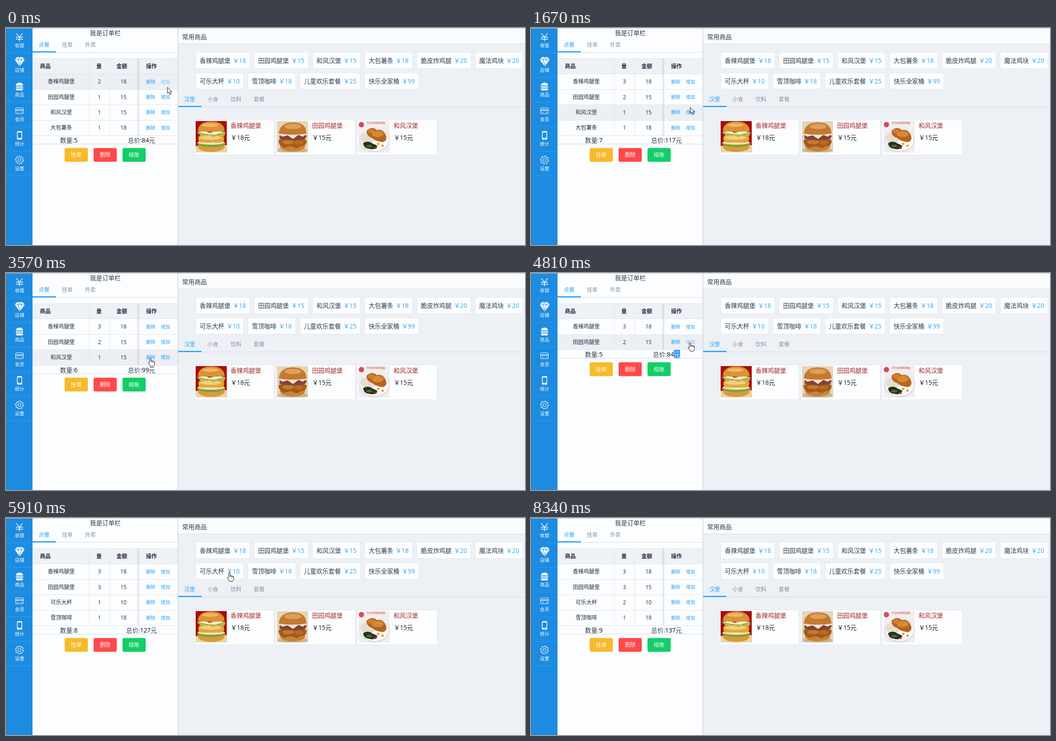
Recreate the animation shown at these times as an HTML page. Size 1155x485 px, loop 8440 ms.

```html
<!DOCTYPE html>
<html lang="zh-CN">
<head>
<meta charset="utf-8">
<title>订单</title>
<style>
html, body { margin: 0; width: 100%; height: 100%; overflow: hidden; background: #edf0f5; }
svg { display: block; width: 1155px; height: 485px; font-family: "Open Sans", "Noto Sans CJK SC", "Noto Sans CJK", sans-serif; }
</style>
</head>
<body>
<svg id="stage" viewBox="0 0 1155 485"></svg>
<script>
const LOOP = 8440;
const BLUE = '#20a0ff', INK = '#2c3e50', DARK = '#1f2d3d', LINE = '#dfe6ec', PALE = '#fcfdfe', GREY = '#edf0f5';
const BIG = 13.71, MID = 12, SMALL = 10.29, ROW = 34.3, TOP = 102.6;

const menu = [
  ['香辣鸡腿堡', 18], ['田园鸡腿堡', 15], ['和风汉堡', 15], ['大包薯条', 18], ['脆皮炸鸡腿', 20],
  ['魔法鸡块', 20], ['可乐大杯', 10], ['雪顶咖啡', 18], ['儿童欢乐套餐', 25], ['快乐全家桶', 99]
];

// time, order lines as menu index + quantity
const orders = [
  [0, '02 11 21 31'], [290, '03 11 21 31'], [960, '03 12 21 31'], [2880, '03 12 21'], [3720, '03 12'],
  [4940, '03 13'], [5350, '03 13 61'], [5910, '03 13 61 71'], [7010, '03 13 62 71']
];

// time, x, y, hand pointer
const path = [
  [0, 359, 132, 0], [130, 357, 120, 1], [450, 356, 119, 1], [790, 354, 152, 1], [1130, 353, 150, 1],
  [1280, 354, 177, 0], [1800, 354, 177, 0], [2340, 321, 221, 1], [2630, 320, 228, 1], [2750, 320, 225, 1],
  [2900, 320, 225, 1], [3400, 321, 189, 1], [3720, 321, 189, 0], [3860, 324, 181, 0], [4130, 338, 165, 0],
  [4400, 354, 155, 1], [4940, 354, 155, 1], [5300, 482, 113, 1], [5370, 482, 113, 1], [5630, 587, 117, 1],
  [5910, 497, 122, 1], [6030, 497, 122, 1], [6180, 470, 132, 0], [6720, 354, 185, 1], [7010, 354, 185, 1],
  [7160, 390, 205, 0], [7510, 700, 374, 0]
];

// first, last, count of screen updates
const bursts = [
  [0, 0, 1], [130, 1130, 7], [1280, 1280, 1], [1670, 2630, 8], [2750, 3720, 8], [3860, 4400, 5],
  [4810, 5630, 7], [5910, 6860, 8], [7010, 7640, 6], [8340, 8340, 1]
];
const ticks = bursts.flatMap(([a, b, n]) =>
  Array.from({ length: n }, (_, i) => Math.round(n > 1 ? a + (b - a) * i / (n - 1) : a)));

const rect = (x, y, w, h, fill, more = '') =>
  `<rect x="${x}" y="${y}" width="${w}" height="${h}" fill="${fill}" ${more}/>`;
const text = (x, cy, s, size, fill, more = '') =>
  `<text x="${x}" y="${(cy + size * 0.37).toFixed(2)}" font-size="${size}" fill="${fill}" ${more}>${s}</text>`;
const oval = (x, y, rx, ry, fill, more = '') =>
  `<ellipse cx="${x}" cy="${y}" rx="${rx}" ry="${ry}" fill="${fill}" ${more}/>`;
const shape = (d, fill, more = '') => `<path d="${d}" fill="${fill}" ${more}/>`;
const MIDDLE = 'text-anchor="middle"', BOLD = 'font-weight="700"';

function sidebar() {
  const line = d => shape(d, 'none', 'stroke="#fff" stroke-width="1.4"');
  const teeth = Array.from({ length: 48 }, (_, i) => {
    const a = (i + 0.5) * Math.PI / 24, r = i % 6 < 3 ? 9 : 7.2;
    return `${(30 + r * Math.cos(a)).toFixed(1)} ${(295 + r * Math.sin(a)).toFixed(1)}`;
  }).join('L');
  const icons = [
    line('M23 12L30 20.5L37 12M30 20.5V29.5M22 20.5H38M22 25H38'),
    shape('M24 65H37L41.5 71L30.5 86L19.5 71Z', '#fff') +
      shape('M20 71H41M24 65L27 71L30.5 65.5L34 71L37 65M27 71L30.5 85L34 71', 'none', 'stroke="#1d8ce0" stroke-width=".9"'),
    shape('M22 128Q23 122 30 122T38 128Z', '#fff') + rect(21.5, 129.5, 17, 2, '#fff', 'rx="1"') +
      rect(22, 132.8, 16, 2, '#fff', 'rx="1"') + shape('M22 136H38Q38 139.5 35 139.5H25Q22 139.5 22 136Z', '#fff'),
    shape('M23 178.5H37Q38.5 178.5 38.5 180V190Q38.5 191.5 37 191.5H23Q21.5 191.5 21.5 190V180Q21.5 178.5 23 178.5ZM21.5 182.5H38.5M21.5 184.5H38.5M24 188.5H28M33 188.5H36', 'none', 'stroke="#fff"'),
    rect(24.5, 230.5, 11.5, 19, '#fff', 'rx="2"') + rect(26, 233.5, 8.5, 12, '#1d8ce0') + oval(30.2, 247.5, 1, 1, '#1d8ce0'),
    shape('M' + teeth + 'Z', 'none', 'stroke="#fff" stroke-width="1.1"') + oval(30, 295, 3.2, 3.2, 'none', 'stroke="#fff" stroke-width="1.1"')
  ];
  const labels = ['收银', '店铺', '商品', '会员', '统计', '设置'];
  return rect(0, 0, 59, 485, '#1d8ce0') + icons.join('') +
    labels.map((s, i) => text(30.3, 39 + 55 * i, s, SMALL, '#fff', MIDDLE) + rect(0, 55 + 55 * i, 59, 1, BLUE)).join('');
}

function tabs(x, cy, right, names) {
  return rect(x, cy + 16, right - x, 1, '#d1dbe5') + rect(x, cy + 14, 52, 2.6, BLUE) +
    names.map((s, i) => text(x + 13.8 + 51.5 * i, cy, s, MID, i ? '#8391a5' : BLUE)).join('');
}

function chips() {
  const draw = (items, y) => {
    let x = 422;
    return items.map(([name, price]) => {
      const step = 60.6 + 13.88 * name.length, left = Math.round(x), w = Math.round(step - 9.2);
      x += step;
      return rect(left + 0.5, y + 0.5, w - 1, 36, PALE, 'stroke="#e5e9f2"') +
        text(left + 9, y + 19, name, BIG, INK) +
        text(left + w - 9, y + 19, '￥' + price, BIG, '#35a5f5', 'text-anchor="end"');
    }).join('');
  };
  return draw(menu.slice(0, 6), 54) + draw(menu.slice(6), 100);
}

const photos = [
  rect(0, 0, 70, 70, '#a80d0c') + shape('M0 56Q35 48 70 54V70H0Z', '#e7d7a4') +
    oval(35, 57, 30, 12, '#d99a3d') + oval(35, 50, 32, 8, '#7fa136') + oval(35, 48, 30, 5, '#efe4b3') +
    rect(6, 31, 58, 17, '#e5a63f', 'rx="8"') + oval(33, 37, 24, 5, '#f3cf78') +
    shape('M3 25Q10 20 20 24T40 23T67 25L64 34L52 30L40 36L26 30L14 35Z', '#a9bd55') +
    shape('M8 25L20 21L32 27L48 22L62 25L44 30L26 29Z', '#f2edcf') +
    shape('M5 22Q6 1 35 1T65 22Q35 26 5 22Z', '#dc9136') + oval(33, 9, 18, 4, '#efb862'),
  rect(0, 0, 70, 70, '#e3d5b9') + oval(35, 65, 34, 6, '#c9b491') +
    oval(35, 56, 28, 12, '#c88338') + shape('M4 42Q35 34 66 42Q68 56 53 56L45 61L31 56L16 60Q2 54 4 42Z', '#a45a1b') +
    oval(25, 47, 13, 5, '#c57a2a') + oval(49, 48, 10, 5, '#bd6a22') + oval(35, 38, 30, 5, '#7a4a3c') +
    oval(36, 34, 31, 5, '#8d3a3c') + shape('M4 29Q35 24 66 29L58 35L48 31L36 40L24 32L12 35Z', '#eee6d0') +
    shape('M4 28Q6 3 36 3T66 28Q35 33 4 28Z', '#c47a30') + oval(36, 12, 19, 6, '#dda058'),
  rect(0, 0, 70, 70, '#f1eeee') + oval(6.5, 8, 6, 6, '#d64b5c') + text(18, 4, '今日好味鸡块饭', 6, '#c4444c') +
    oval(36, 43, 34, 27, '#dcdce0') + oval(36, 42, 32, 25, '#faf9f8') +
    oval(21, 38, 16, 13, '#e5ddd0') + shape('M18 22Q29 10 41 20Q55 17 61 31Q66 43 55 47Q39 46 31 38Q18 34 18 22Z', '#b96420') +
    oval(43, 29, 13, 7, '#d58a35') + oval(29, 23, 8, 5, '#cf7f30') +
    shape('M10 50Q20 42 31 50L43 55Q37 66 24 62Q12 61 10 50Z', '#25331f') +
    oval(24, 56, 7, 3, '#51682c') + oval(44, 51, 6, 4.5, '#fff') + oval(44, 51, 3, 2.4, '#e39b36') +
    oval(54, 55, 6, 4.5, '#fff') + oval(54, 55, 3, 2.4, '#e39b36') + oval(38, 60, 3, 2.5, '#b42c22')
];

function cards() {
  return [420, 601, 782].map((x, i) =>
    rect(x - 0.5, 205.5, i < 2 ? 177 : 178.5, 78, PALE, 'stroke="#e2e7f0"') +
    `<svg x="${x + [2, 2, 2.5][i]}" y="208" width="69.5" height="70" viewBox="0 0 70 70" preserveAspectRatio="none">${photos[i]}</svg>` +
    text(x + 79.5 + i * 0.5, 217.5, menu[i][0], BIG, '#a52a2a') +
    text(x + 80 + i * 0.5, 244.5, `￥${menu[i][1]}元`, BIG, '#151d26')).join('');
}

function backdrop() {
  return rect(0, 0, 1155, 485, GREY) + rect(59, 0, 323, 485, PALE) +
    text(221, 11, '我是订单栏', BIG, INK, MIDDLE) + tabs(59, 38, 382, ['点餐', '挂单', '外卖']) +
    rect(383, 0, 772, 35, '#fafbfd') + rect(383, 35, 772, 1, '#d3dce6') + text(392, 19.5, '常用商品', BIG, INK) +
    chips() + tabs(383, 160, 1155, ['汉堡', '小食', '饮料', '套餐']) + cards() +
    rect(382, 0, 1.3, 485, '#c9d3e2') + sidebar() +
    rect(0, 0, 1155, 1, '#b9bfc5') + rect(0, 0, 1, 485, '#4c6f8e');
}

function pointerAt(t) {
  if (t >= 7640) return null;
  let i = path.findLastIndex(p => p[0] <= t);
  const a = path[i], b = path[i + 1] || a;
  const k = b === a ? 0 : (t - a[0]) / (b[0] - a[0]);
  return { x: a[1] + (b[1] - a[1]) * k, y: a[2] + (b[2] - a[2]) * k, hand: a[3] };
}

function pointer(p) {
  const d = p.hand
    ? 'M-1.6 11.5V1.6Q0-1 1.6 1.6V7Q3.2 5.7 4.4 7.5Q6 6.3 7.2 8.2Q9.6 7.4 9.6 10V13.5Q9.5 16.5 7.6 19.5H0Q-1 16.5-4.2 12.6Q-4.4 9.5-1.6 11.5ZM1.6 7V10M4.4 7.5V10.5M7.2 8.2V11'
    : 'M.5.5V14L3.6 11.2L6 16.6L8.2 15.6L5.9 10.4H10Z';
  return shape(d, '#fff', `stroke="#111" stroke-linejoin="round" transform="translate(${p.x.toFixed(1)} ${p.y.toFixed(1)})"`);
}

function scene(t) {
  const rows = orders.findLast(o => o[0] <= t)[1].split(' ').map(s => ({ item: menu[s[0]], qty: +s[1] }));
  const p = pointerAt(t), bottom = TOP + ROW * rows.length;
  const over = p && p.x < 382 ? Math.floor((p.y - TOP) / ROW) : -1;
  let lit = p && p.hand && p.x > 340 ? over : -1;
  if (t < 130) lit = 0;
  if (t >= 7010 && t < 8340) lit = 2;

  let out = rect(59, 68, 323, 34.6, '#eef1f6') + rect(59, 68, 323, 1, LINE) + rect(59, 102, 323, 1, LINE);
  [['商品', 75.5], ['量', 201], ['金额', 245.7], ['操作', 311.7]].forEach(([s, x]) => out += text(x, 85.5, s, MID, DARK, BOLD));

  rows.forEach(({ item, qty }, i) => {
    const y = TOP + ROW * i, cy = y + 17.4;
    if (i === over) out += rect(59, y + 0.4, 323, ROW, '#eceff4');
    out += rect(59, Math.round(y + ROW), 323, 1, LINE) +
      text(123, cy, item[0], MID, DARK, MIDDLE) + text(208, cy, qty, MID, DARK, MIDDLE) +
      text(261.5, cy, item[1], MID, DARK, MIDDLE) + text(311.8, cy, '删除', SMALL, BLUE) +
      text(344.7, cy, '增加', SMALL, i === lit ? '#79c5ff' : BLUE);
  });

  const h = bottom - 68;
  out += rect(185, 68, 1, h, LINE) + rect(230, 68, 1, h, LINE) +
    rect(291, 68, 5, h, 'url(#shade)') + rect(295.5, 68, 1, h, LINE);

  const count = rows.reduce((n, r) => n + r.qty, 0), total = rows.reduce((n, r) => n + r.qty * r.item[1], 0);
  const picked = t >= 3860 && t < 4940, cy = bottom + 11;
  if (picked) out += rect(318, Math.round(bottom + 1), 13.7, 18, '#3390ff');
  const num = n => `<tspan fill="#0c1218">${n}</tspan>`;
  out += text(139.8, cy, '数量:' + num(count), BIG, INK, MIDDLE) +
    text(301.5, cy, `总价:${num(total)}<tspan fill="${picked ? '#fff' : INK}">元</tspan>`, BIG, INK, MIDDLE) +
    rect(59, Math.round(bottom + 19), 323, 1, '#cfd8e2');

  [['挂单', '#f7ba2a'], ['删除', '#ff4949'], ['结账', '#13ce66']].forEach(([s, c], i) => {
    const x = 130.5 + 64.4 * i;
    out += rect(x, (bottom + 28.4).toFixed(1), 51.6, 30.8, c, 'rx="3.4"') + text(x + 25.8, bottom + 44, s, MID, '#fff', MIDDLE);
  });
  return out + (p ? pointer(p) : '');
}

const stage = document.getElementById('stage');
stage.innerHTML = '<defs><linearGradient id="shade"><stop offset="0" stop-color="#1f2d3d" stop-opacity="0"/>' +
  '<stop offset="1" stop-color="#1f2d3d" stop-opacity=".16"/></linearGradient></defs>' + backdrop() + '<g id="live"></g>';
const live = document.getElementById('live');

let shown = -1;
const start = performance.now();
function frame() {
  const t = (performance.now() - start) % LOOP;
  const tick = ticks.findLast(k => k <= t);
  if (tick !== shown) live.innerHTML = scene(shown = tick);
  requestAnimationFrame(frame);
}
frame();
</script>
</body>
</html>
```
